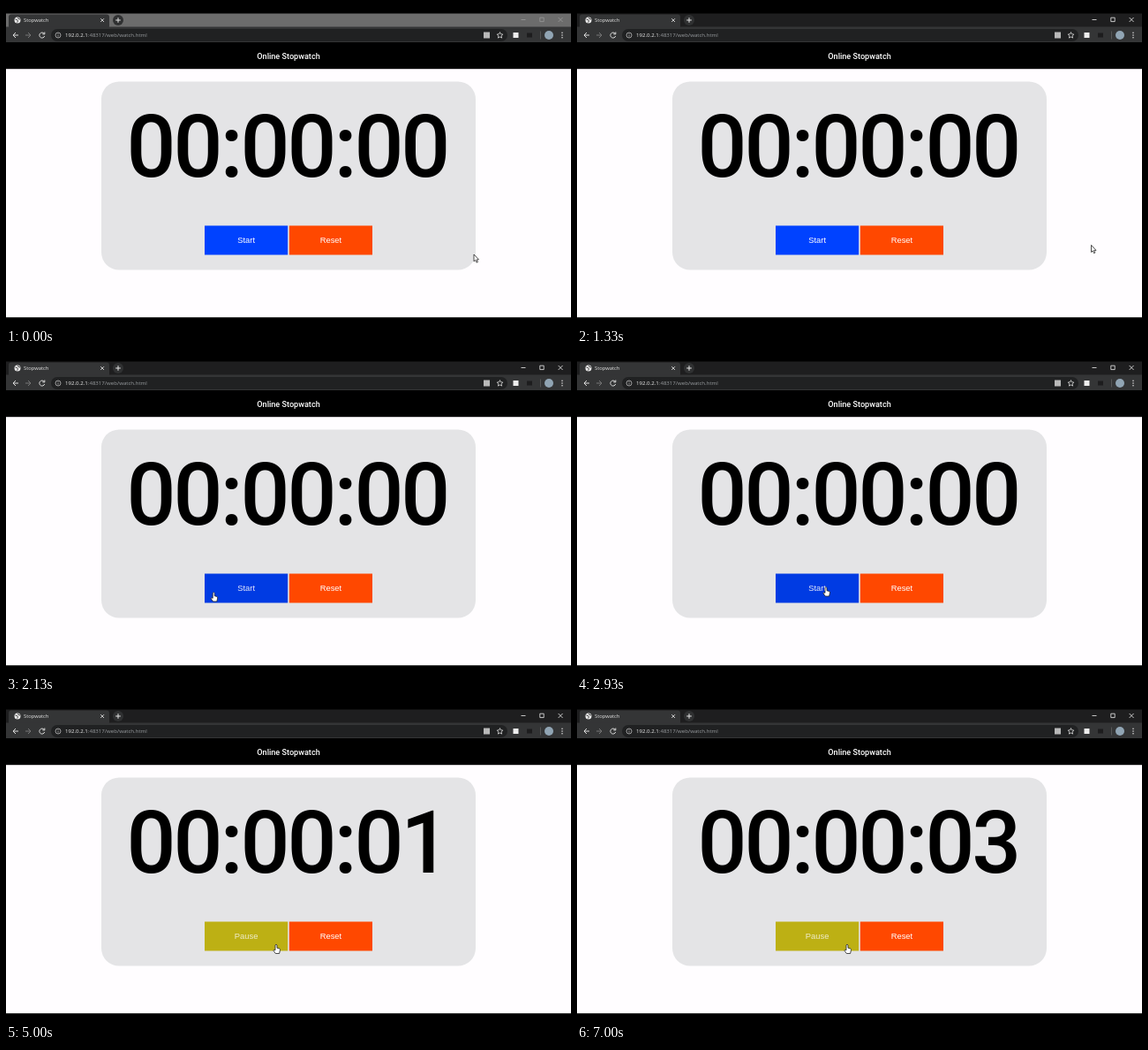
Animation of 640x362 px, one loop 8 s. Source, as an HTML page with a canvas:

```html
<!DOCTYPE html>
<html lang="en">
<head>
<meta charset="utf-8">
<title>Stopwatch</title>
<style>
html, body { margin: 0; width: 100%; height: 100%; overflow: hidden; background: #000; }
canvas { display: block; width: 640px; height: 362px; }
</style>
</head>
<body>
<canvas id="stage" width="640" height="362"></canvas>
<script>
const ctx = document.getElementById('stage').getContext('2d');
const LOOP = 8000, TICK = 1000 / 15;
const ACTIVE_AT = 930, PAUSE_AT = 3130;
const UI = '"Open Sans", "Noto Sans", sans-serif';
const ROBOTO = 'Roboto, sans-serif';
const ARIAL = '"Liberation Sans", Arial, sans-serif';

// Pointer tip: time, x, y
const PATH = [
  [0, 530, 281], [870, 608, 283], [930, 608, 280], [1330, 582.5, 270.5],
  [1400, 582.5, 270.5], [1700, 420, 289], [1930, 202, 290], [2130, 235, 269.5],
  [2270, 257, 267], [2330, 266, 266], [2470, 266, 266], [2870, 282, 263.5],
  [3330, 282, 263.5], [3800, 306, 274]
];

function pointer(t) {
  const i = PATH.findIndex(p => p[0] > t);
  if (i < 0) return PATH[PATH.length - 1].slice(1);
  const [t0, x0, y0] = PATH[i - 1], [t1, x1, y1] = PATH[i];
  const u = (t - t0) / (t1 - t0), k = u * u * (3 - 2 * u);
  return [x0 + (x1 - x0) * k, y0 + (y1 - y0) * k];
}

function rect(x, y, w, h, color) {
  ctx.fillStyle = color;
  ctx.fillRect(x, y, w, h);
}

function round(x, y, w, h, r, color) {
  ctx.fillStyle = color;
  ctx.beginPath();
  ctx.roundRect(x, y, w, h, r);
  ctx.fill();
}

function disc(x, y, r, color) {
  ctx.fillStyle = color;
  ctx.beginPath();
  ctx.arc(x, y, r, 0, 7);
  ctx.fill();
}

function stroke(d, color, width = 1) {
  ctx.strokeStyle = color;
  ctx.lineWidth = width;
  ctx.stroke(new Path2D(d));
}

function text(str, x, y, font, color, align = 'left', spacing = 0) {
  ctx.font = font;
  ctx.letterSpacing = spacing + 'px';
  ctx.textAlign = align;
  ctx.fillStyle = color;
  ctx.fillText(str, x, y);
  const w = ctx.measureText(str).width;
  ctx.letterSpacing = '0px';
  return w;
}

function drawTabs(active) {
  rect(0, 8.5, 640, 15.5, active ? '#1e1e1f' : '#6c6c6c');
  round(3, 9.5, 114, 16, 3, '#343536');
  rect(0, 23.5, 640, 17.5, '#343536');
  disc(13, 16, 3.5, '#e8e8e8');
  stroke('M10.5 15l2 .5 1 1.5-1 1.5M13.5 13l.5 1.5 2 .5', '#444', 1);
  text('Stopwatch', 20, 18.4, '5.8px ' + UI, '#e4e4e4');
  stroke('M107.2 14.2l3.8 3.8m0-3.8l-3.8 3.8', '#ddd', 0.9);
  disc(127, 16, 6, active ? '#303132' : '#2f3031');
  stroke('M124.2 16h5.6m-2.8-2.8v5.6', '#e6e6e6', 1);
  const c = active ? '#eee' : '#999';
  stroke('M583.5 15.5h5M604.8 13.2h4.4v4.4h-4.4zM625.6 13l5 5m0-5l-5 5', c, 0.8);
}

function drawToolbar() {
  stroke('M14 33H8m3-3l-3 3 3 3', '#ddd', 1);
  stroke('M22 33h6m-3-3l3 3-3 3', '#777', 1);
  stroke('M43.2 31.2A3 3 0 1 0 43.7 34M43.8 29.5v2.4h-2.4', '#ddd', 1);
  round(51, 26, 517, 14, 7, '#202122');
  stroke('M56 33a3 3 0 1 0 6 0a3 3 0 1 0-6 0M59 32.6v2M59 31v.8', '#bbb', 0.8);
  const font = '6.1px ' + UI;
  const w = text('192.0.2.1', 67, 35.2, font, '#eee');
  text(':48317/web/watch.html', 67 + w, 35.2, font, '#999da0');
  rect(541, 29.5, 7, 7, '#b8b8b8');
  stroke('M559.5 29.6l1 2.2 2.4.3-1.8 1.6.5 2.4-2.1-1.2-2.1 1.2.5-2.4-1.8-1.6 2.4-.3z', '#ddd', 0.8);
  rect(574.5, 30, 6, 6, '#eee');
  rect(590, 30.5, 6, 5, '#1d1d1e');
  rect(605, 28.5, 0.7, 9, '#666');
  disc(615, 33, 5, '#91a5b4');
  for (const y of [30.3, 33, 35.7]) disc(630, y, 0.8, '#ddd');
}

function button(x, label, color, ink) {
  rect(x, 248.5, 94.2, 33, color);
  text(label, x + 47.1, 268.3, '9.4px ' + ARIAL, ink, 'center');
}

function drawPage(t, hover) {
  rect(0, 41, 640, 30.2, '#000');
  text('Online Stopwatch', 320, 60, '500 9.1px ' + ROBOTO, '#fff', 'center');
  rect(0, 71.2, 640, 281, '#fffdff');
  round(108, 85.5, 424, 213, 20, '#e4e4e6');
  const sec = Math.max(0, Math.floor(t / 1000) - 4);
  text('00:00:0' + sec, 136.6, 193.2, '500 98.6px ' + ROBOTO, '#000', 'left', -3.1);
  if (t >= PAUSE_AT) button(225, 'Pause', '#bdb014', '#efeccc');
  else button(225, 'Start', hover ? '#003be3' : '#0042ff', hover ? '#e3e8fb' : '#fff');
  button(320.8, 'Reset', '#ff4800', '#fff');
}

function drawCursor(x, y, hand) {
  const shape = new Path2D(hand
    ? 'M-1 1Q0-.8 1 1V4.2L3.8 5Q4.6 5.3 4.5 6.5L3.6 10.5H-.7L-3 7.3Q-3.2 5.7-1 6.8Z'
    : 'M0 0V8L1.8 6.4 3 9.2 4.4 8.6 3.2 5.9H5.5Z');
  ctx.save();
  ctx.translate(x, y);
  ctx.fillStyle = '#fff';
  ctx.strokeStyle = '#222';
  ctx.lineWidth = 0.8;
  ctx.lineJoin = 'round';
  ctx.fill(shape);
  ctx.stroke(shape);
  ctx.restore();
}

function draw(ms) {
  const t = Math.floor((ms % LOOP + 5) / TICK) * TICK + 5;
  const [x, y] = pointer(t);
  const hover = x > 225 && x < 319 && y > 248.5 && y < 281.5;
  rect(0, 0, 640, 362, '#000');
  drawTabs(t >= ACTIVE_AT);
  drawToolbar();
  drawPage(t, hover);
  drawCursor(x, y, hover);
}

const start = performance.now();
function frame() {
  draw(performance.now() - start);
  requestAnimationFrame(frame);
}
frame();
</script>
</body>
</html>
```
